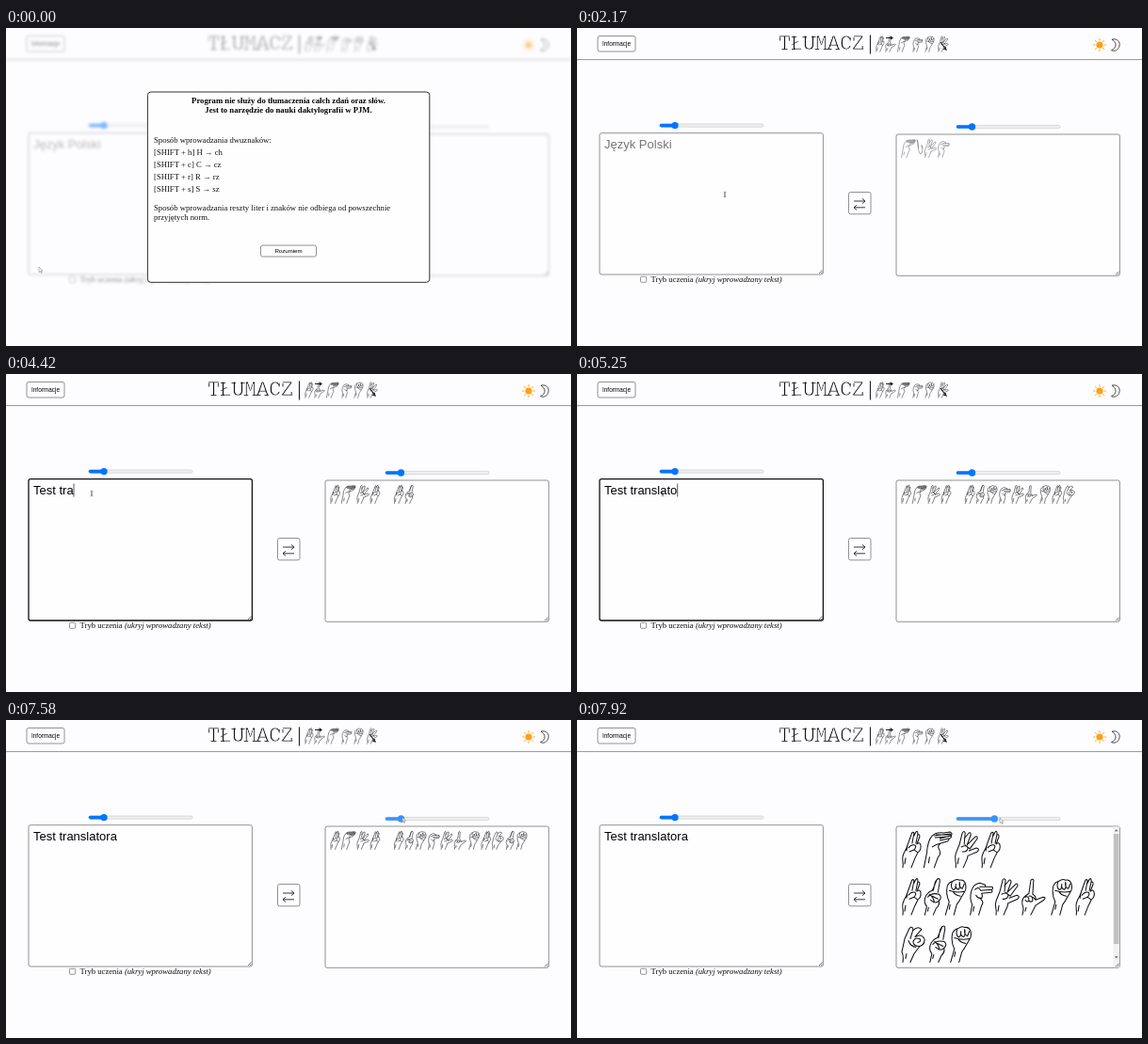
An HTML page that plays this animation: 600x338 px, repeating every 8000 ms.

```html
<!DOCTYPE html>
<html lang="pl">
<head>
<meta charset="utf-8">
<title>Tłumacz</title>
<style>
  html, body { margin: 0; width: 100%; height: 100%; overflow: hidden; background: #fdfcfe; }
  svg { display: block; width: 600px; height: 338px; }
  .sans { font-family: "Liberation Sans", sans-serif; }
  .serif { font-family: "Liberation Serif", serif; font-size: 8.69px; }
  .mono { font-family: "Liberation Mono", monospace; font-size: 21.67px; stroke: #fdfcfe; stroke-width: .85; }
  .blurred { filter: blur(1.6px); opacity: .5; }
  .line { fill: none; stroke: #222; }
  .box { fill: #fefdff; stroke: #767676; stroke-width: .8; }
  .focus { stroke: #101010; stroke-width: 1.3; }
  .hand { fill: none; stroke: #111; stroke-width: 1.05; stroke-linecap: round; stroke-linejoin: round; }
  .faint { stroke: #666; }
  .middle { text-anchor: middle; }
  .bold { font-weight: bold; }
</style>
</head>
<body>
<svg viewBox="0 0 600 338">
  <g id="page">
    <path d="M0 33.6H600" stroke="#8a8a8a" stroke-width=".9"/>
    <rect class="box" x="22" y="8.5" width="40" height="16.5" rx="2"/>
    <text class="sans middle" x="42" y="19.2" font-size="6.45">Informacje</text>
    <text class="mono" x="214" y="23" fill="#111">TŁUMACZ|</text>
    <path class="line" d="M217.5 22.6h6M215.6 9.5v4M225.4 9.5v4M228 22.6h4M228 9.6h5M239.5 9.6h4.5M249 9.6h4.5M252.7 22.6h4.5M261.8 22.6h4.5M266 22.6h4.5M274.5 22.6h4.5M290.2 10v3.5M294 10v3.5M303.2 22.5v-3.5" stroke-width=".9"/>
    <g id="titleHands"></g>
    <path class="line" d="M328 10.5h7m-2-1.5l2 1.5-2 1.5M386 15l6 8m-1-3l1 3-3-1" stroke-width="1.2"/>
    <circle cx="555" cy="18" r="3.6" fill="#ffa014"/>
    <path id="rays" stroke="#ffa014" stroke-width="1"/>
    <path class="line" d="M568 12.2C574 10.6 577 15 576 19C575 23.5 571 25.3 567.5 23.6C573.4 21.5 573.5 15 568 12.2Z" stroke-width=".8"/>

    <g id="sliders"></g>
    <rect id="source" class="box" x="24" y="111.7" width="237.4" height="150.3" rx="2"/>
    <rect class="box" x="339" y="113" width="237.4" height="150.3" rx="2"/>
    <text id="typed" class="sans" x="29" y="128.2" font-size="13"></text>
    <path id="caret" stroke="#111" stroke-width=".7"/>
    <g id="output"></g>
    <g id="scrollbar">
      <rect x="569.3" y="113.5" width="6.7" height="149.3" fill="#f1f1f1"/>
      <rect x="569.9" y="121" width="5.5" height="117" fill="#c1c1c1"/>
      <path d="M571 118.2l1.7-2 1.7 2zM571 251.3l1.7 2 1.7-2z" fill="#555"/>
    </g>
    <path class="line" d="M257 261l3.6-3.6M259 261l1.6-1.6M572 262.3l3.6-3.6M574 262.3l1.6-1.6" stroke-width=".6"/>

    <rect class="box" x="288.5" y="174.5" width="23.5" height="23.3" rx="2"/>
    <path class="line" d="M294 184h12m-3-2.6l3 2.6-3 2.6M306 190.8h-12m3-2.6l-3 2.6 3 2.6" stroke-width=".9"/>
    <rect class="box" x="67.5" y="264.3" width="6.2" height="6" rx="1"/>
    <text class="serif" x="78.5" y="270" fill="#111">Tryb uczenia <tspan font-style="italic">(ukryj wprowadzany tekst)</tspan></text>
  </g>

  <g id="modal">
    <rect x="150.4" y="68" width="299.4" height="202.3" rx="3.5" fill="#fefefe" stroke="#1a1a1a" stroke-width=".9"/>
    <g class="serif middle bold">
      <text x="300" y="80">Program nie służy do tłumaczenia całch zdań oraz słów.</text>
      <text x="300" y="90.3">Jest to narzędzie do nauki daktylografii w PJM.</text>
    </g>
    <g class="serif" fill="#111">
      <text x="157" y="121.7">Sposób wprowadzania dwuznaków:</text>
      <text x="157" y="134.8">[SHIFT + h] H → ch</text>
      <text x="157" y="147.8">[SHIFT + c] C → cz</text>
      <text x="157" y="160.8">[SHIFT + r] R → rz</text>
      <text x="157" y="173.8">[SHIFT + s] S → sz</text>
      <text x="157" y="193.7">Sposób wprowadzania reszty liter i znaków nie odbiega od powszechnie</text>
      <text x="157" y="203.7">przyjętych norm.</text>
    </g>
    <rect class="box" x="270.5" y="231" width="59" height="12" rx="2"/>
    <text class="sans middle" x="300" y="239.2" font-size="6.1">Rozumiem</text>
  </g>

  <g id="mouse" opacity=".75">
    <path id="arrow" d="M0 0V5.6L1.4 4.4L2.4 6.6L3.2 6.2L2.3 4.1H4Z" fill="#fff" stroke="#444" stroke-width=".5"/>
    <path id="beam" class="line" d="M-1.4 -2.8Q0 -2.8 0 -2V2Q0 2.8 -1.4 2.8M1.4 -2.8Q0 -2.8 0 -2V2Q0 2.8 1.4 2.8" stroke-width=".6"/>
  </g>
</svg>
<script>
const $ = id => document.getElementById(id);
const LOOP = 8000, FPS = 12;
const CLOSE = 25, FOCUS = 33, GRAB = 90;
const TEXT = 'Test translatora';
const KEYS = [36, 41, 43, 45, 46, 47, 50, 53, 55, 56, 57, 59, 60, 62, 64, 67];

// Sign-language letters, each drawn 40 units tall: [advance, outline]
const SIGNS = {
  t: [23.5, 'M2 39C3 34 1 31 2 27Q3 23 6 18L11 4Q12 0 14 2L12 13M14 5L16 1Q18 -1 18 3L16 13M18 4Q20 3 20 6L17 14Q20 11 21 15Q22 20 18 23L15 29L11 39M8 18Q11 14 15 15Q17 17 14 20L9 22M14 20L18 23M7 15L6 21M5 29l-1 6'],
  e: [33, 'M1 39L4 24Q5 10 10 5Q14 1 22 2L29 1Q32 3 30 5L18 8M12 5L29 3M14 4L30 4M30 5Q31 7 28 8L18 10M28 8Q28 10 26 11L19 13Q15 16 17 19Q20 24 16 28L12 39M10 17Q14 14 19 13M13 7L27 6M7 28l-1 6'],
  s: [28, 'M2 39C3 32 0 30 2 24L6 14L9 2Q11 -1 12 2L11 14M11 8L16 2Q18 1 18 4L14 15L23 6Q25 5 25 8L17 19M8 17Q13 14 15 18Q14 23 9 22M16 21L24 18Q28 19 25 22L16 26M15 26L14 30L10 39M12 15L17 19M5 29l-1 6'],
  r: [22, 'M2 39L4 30Q0 25 3 19Q6 14 10 13L15 1Q18 -1 18 3L16 15M11 13L13 4L15 1M5 20Q9 15 17 17Q21 20 17 24Q13 28 8 23M10 19L16 22M7 17Q11 20 12 25M17 24Q18 29 14 32L11 39M6 31l-1 4'],
  a: [26.5, 'M2 39L6 25Q2 17 4 8Q6 4 10 3Q14 0 17 2Q21 1 23 5Q25 11 22 15L19 20Q17 24 14 28L11 39M9 4Q7 9 10 12Q13 13 13 6Q12 11 16 12Q18 10 17 4Q16 10 20 11L22 6M6 13Q14 16 22 14M10 14Q12 18 18 19M7 28l-1 5'],
  n: [27.5, 'M2 39L4 28Q1 22 3 14Q5 6 12 5L18 7L18 9M12 9L25 9Q27 10 25 12L13 13M25 12Q26 15 24 15L14 16Q16 20 13 22Q17 26 14 29L11 39M7 12Q11 8 13 13M8 18Q10 22 14 21M6 30l-1 5'],
  l: [31, 'M2 39Q4 32 2 28Q1 22 5 19L9 16L11 2Q13 0 14 2L13 17Q17 19 16 23L24 20Q28 20 25 23L16 29L11 39M5 20Q9 18 9 24Q7 26 5 23M9 19Q13 18 13 24Q11 26 9 24M13 20L16 23M6 31l-1 4'],
  o: [29, 'M2 39Q3 32 1 28L4 14L9 3Q12 0 13 4L10 14M13 5Q18 0 22 4Q20 6 15 12Q22 8 25 14Q26 20 20 22Q13 22 13 17Q15 12 20 14Q22 17 18 18M8 16Q10 22 16 23M20 22L14 30L10 39M6 30l-1 5'],
  j: [16, 'M1 2Q3 4 3 14Q5 32 9 32Q15 30 11 13M2 2Q5 12 4 18M11 14L13 19']
};
const LINE_HEIGHT = 50.5;

// Mouse stops: [step, x, y]
const MOUSE = [
  [0, 35, 254], [1, 60, 190], [2, 95, 106], [3, 130, 175], [4, 157, 255], [5, 172, 300],
  [13, 172, 300], [16, 310, 314], [17, 480, 305], [18, 462, 270], [19, 430.5, 252],
  [22, 318, 238], [23, 303, 236], [24, 303, 236], [25, 230, 207], [26, 157, 177],
  [29, 112, 140], [33, 91, 127], [70, 91, 127], [71, 96, 115], [72, 103, 104],
  [75, 103, 104], [80, 260, 95], [84, 437, 97], [85, 426, 103], [88, 420.5, 103],
  [91, 420.5, 103], [92, 426, 104], [95, 449, 104], [96, 449, 104]
];
const THUMB = [[0, 419.5], [91, 419.5], [92, 422], [95, 443.3], [96, 443.3]];

function at(table, step) {
  const i = Math.max(1, table.findIndex(row => row[0] >= step));
  const [a, b] = [table[i - 1], table[i]];
  const p = (step - a[0]) / (b[0] - a[0]);
  return a.slice(1).map((v, n) => v + (b[n + 1] - v) * p);
}

const sign = (c, x, y, scale, tone = '') =>
  `<path class="hand ${tone}" d="${SIGNS[c][1]}" transform="translate(${x} ${y}) scale(${scale})"/>`;

const wordWidth = word => [...word].reduce((sum, c) => sum + SIGNS[c][0], 0);

function spell(text, scale, tone) {
  const limit = 226 / scale;
  let x = 0, row = 0, out = '';
  text.split(' ').forEach((word, i) => {
    if (i) x += 27;
    if (x && x + wordWidth(word) > limit) { x = 0; row++; }
    for (const c of word) {
      if (x + SIGNS[c][0] > limit) { x = 0; row++; }
      out += sign(c, 344 + x * scale, 118 + row * LINE_HEIGHT * scale, scale, tone);
      x += SIGNS[c][0];
    }
  });
  return { out, height: (row + 1) * LINE_HEIGHT * scale };
}

const slider = (x, y, thumb, color) => `
  <rect x="${x}" y="${y - 1.6}" width="110" height="3.2" rx="1.6" fill="#efefef" stroke="#bbb" stroke-width=".5"/>
  <rect x="${x - .3}" y="${y - 1.8}" width="${thumb - x}" height="3.6" rx="1.8" fill="${color}"/>
  <circle cx="${thumb}" cy="${y}" r="3.7" fill="${color}"/>`;

const show = (id, on) => { $(id).style.display = on ? '' : 'none'; };

function draw(step) {
  const open = step < CLOSE;
  const focused = step >= FOCUS && step < GRAB;
  const count = KEYS.filter(k => k <= step).length;
  const signed = KEYS.filter(k => k < step).length;
  const [thumb] = at(THUMB, step);
  const [mx, my] = at(MOUSE, step);

  show('modal', open);
  $('page').classList.toggle('blurred', open);
  $('source').classList.toggle('focus', focused);

  const typed = $('typed');
  typed.textContent = count ? TEXT.slice(0, count) : 'Język Polski';
  typed.setAttribute('fill', count ? '#000' : '#757575');

  const since = count ? step - KEYS[count - 1] - 1 : step - FOCUS;
  show('caret', focused && (since < 0 || since % 12 < 6));
  const caretX = count ? 29.4 + typed.getSubStringLength(0, count) : 29.4;
  $('caret').setAttribute('d', `M${caretX} 116.5v14`);

  const scale = .5 + (thumb - 419.5) / 48;
  const result = signed ? spell(TEXT.slice(0, signed).toLowerCase(), scale) : spell('ejsn', .5, 'faint');
  $('output').innerHTML = result.out;
  show('scrollbar', result.height > 149);

  const hoverLeft = step >= 72 && step < 76;
  const rightColor = step >= GRAB ? '#3793ff' : step >= 86 ? '#005cc8' : '#0075ff';
  $('sliders').innerHTML = slider(88, 103.6, 104, hoverLeft ? '#005cc8' : '#0075ff')
    + slider(403, 105, thumb, rightColor);

  const overText = !open && mx > 24 && mx < 261 && my > 112 && my < 262;
  $('mouse').setAttribute('transform', `translate(${mx} ${my})`);
  show('beam', overText);
  show('arrow', !overText);
}

$('titleHands').innerHTML = [...'tlenas']
  .map((c, i) => sign(c, [317, 327, 340, 356, 369, 383][i], 8.5, .43)).join('');
$('rays').setAttribute('d', Array.from({ length: 8 }, (_, i) => {
  const c = Math.cos(i * Math.PI / 4), s = Math.sin(i * Math.PI / 4);
  return `M${555 + 4.6 * c} ${18 + 4.6 * s}L${555 + 6.8 * c} ${18 + 6.8 * s}`;
}).join(''));

let last = -1;
function tick() {
  const step = Math.floor(performance.now() % LOOP * FPS / 1000 + .06);
  if (step !== last) draw(last = step);
  requestAnimationFrame(tick);
}
tick();
</script>
</body>
</html>
```
